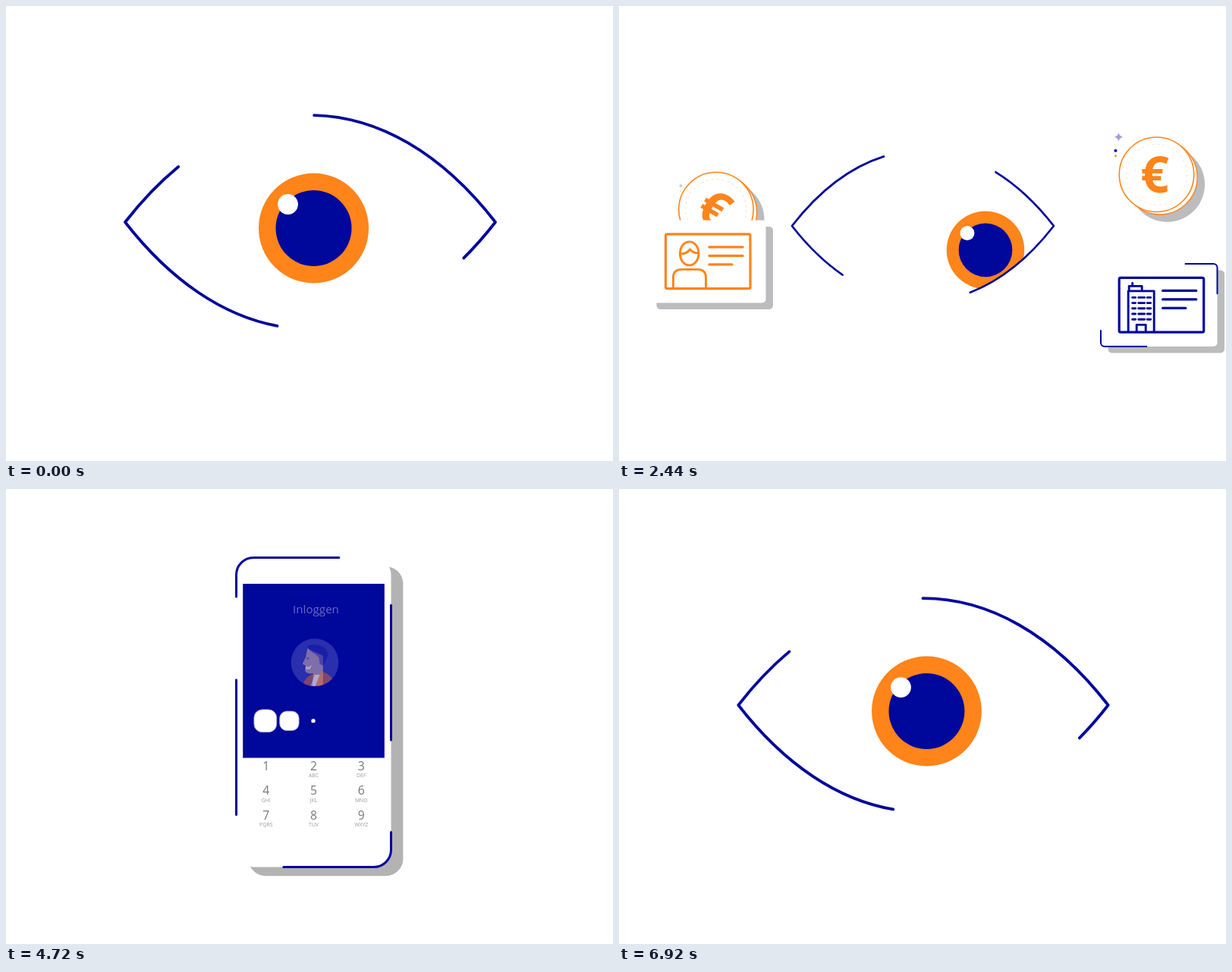
Recreate the animation shown at these times as an HTML page with a canvas. Size 800x600 px, loop 6.96 s.

```html
<!DOCTYPE html>
<html lang="nl">
<head>
<meta charset="utf-8">
<title>Inloggen</title>
<style>
html, body { margin: 0; width: 100%; height: 100%; overflow: hidden; background: #fff; }
canvas { display: block; }
</style>
</head>
<body>
<canvas id="stage" width="800" height="600"></canvas>
<script>
const c = document.getElementById('stage').getContext('2d');
const LOOP = 6960, STEP = 40;
const NAVY = '#00079b', ORANGE = '#ff841a', GREY = '#b3b3b3';

// ---- Easing: t, from and to in ms
const clamp = p => Math.min(1, Math.max(0, p));
const part = (t, from, to) => clamp((t - from) / (to - from));
function ramp(t, from, to) {
  const p = part(t, from, to);
  return p * p * (3 - 2 * p);
}
const during = (t, from, to, fade) => ramp(t, from, from + fade) * (1 - ramp(t, to, to + fade));
// Springs from 0 to 1 with overshoot
function pop(t, from, damping = 8.5) {
  const s = (t - from) / 1000;
  return s <= 0 ? 0 : 1 - Math.exp(-damping * s) * Math.cos(5 * Math.PI * s);
}
// Swells away from 0 and settles back
function bump(t, from) {
  const s = (t - from) / 1000;
  return s <= 0 ? 0 : 0.4 * Math.exp(-4.9 * s) * Math.sin(2.5 * Math.PI * s);
}
const backOut = p => p <= 0 ? 0 : 1 + 2.7 * (p - 1) ** 3 + 1.7 * (p - 1) ** 2;

// ---- Drawing
function group(x, y, scale, draw) {
  c.save();
  c.translate(x, y);
  c.scale(scale, scale);
  draw();
  c.restore();
}
function paint(path, fill, stroke, width) {
  if (fill) { c.fillStyle = fill; c.fill(path); }
  if (stroke) { c.strokeStyle = stroke; c.lineWidth = width; c.stroke(path); }
}
function circle(x, y, r, fill, stroke, width) {
  const p = new Path2D();
  p.arc(x, y, r, 0, 7);
  paint(p, fill, stroke, width);
}
// Rounded box running clockwise from the top left
function box(x, y, w, h, r) {
  const p = new Path2D();
  p.moveTo(x + r, y);
  p.arcTo(x + w, y, x + w, y + h, r);
  p.arcTo(x + w, y + h, x, y + h, r);
  p.arcTo(x, y + h, x, y, r);
  p.arcTo(x, y, x + w, y, r);
  p.closePath();
  return p;
}
const boxLength = (w, h, r) => 2 * (w + h) - 8 * r + 2 * Math.PI * r;

function dash(path, total, start, length, width) {
  if (length <= 0) return;
  c.save();
  c.setLineDash([length, total - length]);
  c.lineDashOffset = -start;
  paint(path, null, NAVY, width);
  c.restore();
}
function text(s, x, y, size, color, weight = 400) {
  c.font = `${weight} ${size}px "Open Sans", sans-serif`;
  c.textAlign = 'center';
  c.fillStyle = color;
  c.fillText(s, x, y + size * 0.357);
}

// ---- Eye
const LID = new Path2D('M-244 0C-98 -188 98 -188 244 0C98 188 -98 188 -244 0Z');
const LID_LENGTH = 1168;

function eye(t) {
  const again = t > 5000, time = again ? t - LOOP : t;
  const small = again ? 0 : ramp(t, 400, 860);
  const s = again ? pop(t, 6160) : (1 - 0.293 * small) * (1 - ramp(t, 3180, 3520));
  if (s <= 0) return;
  const left = ramp(time, 620, 1200), right = ramp(time, 1680, 2360), back = ramp(time, 2760, 3120);
  const x = 4.5 - 149.5 * left + 261.7 * right - 112.2 * back;
  const y = 8 + 16 * left + 21 * right - 37 * back;
  const swing = quarter => Math.sin(Math.PI / 2 * time / quarter);
  group(401 - small / 2, 285 + 5 * small, s, () => {
    c.save();
    c.clip(LID);
    circle(x, y, 72.5, ORANGE);
    circle(x, y, 50, NAVY);
    circle(x - 34, y - 31.5, 13.4, '#fff');
    c.restore();
    dash(LID, LID_LENGTH, 297 + 161 * swing(1820), 350, 3.8);
    dash(LID, LID_LENGTH, 919.5 + 123 * swing(2020), 350, 3.8);
  });
}

// ---- Cards and coins
const CARD_W = 153.5, CARD_H = 109;
const TEXT_LINES = new Path2D('M57.500 17h44M57.500 28.500h44M57.500 40h30');
const PERSON = new Path2D('M10 71v-14q0 -10.500 11 -10.500h21q11 0 11 10.500v14' +
  'M43.500 25.500a12.300 15.500 0 1 1 -24.600 0a12.300 15.500 0 1 1 24.600 0M20 26q8 0 12 -6q4 5 11 5');
const BUILDING = new Path2D('M12 70.500v-53h34v53M13 17v-6h17v6M17.500 11v-4M23 70v-8h12v8');
for (let row = 0; row < 5; row++) {
  const y = 26 + row * 7.2;
  BUILDING.addPath(new Path2D(`M17.500 ${y}h4M25.500 ${y}h8M37 ${y}h4.500`));
}
const STAR = new Path2D('M0 -6q.800 5.200 6 6q-5.200 .800 -6 6q-.800 -5.200 -6 -6q5.200 -.800 6 -6z');

function card(x, y, scale, color, inset, starts, length, icon) {
  if (scale <= 0) return;
  group(x + CARD_W / 2, y + CARD_H / 2, scale, () => {
    c.translate(-CARD_W / 2, -CARD_H / 2);
    const body = box(0, 0, CARD_W, CARD_H, 5);
    paint(box(9.5, 8.5, CARD_W, CARD_H, 5), '#bcbcbe');
    paint(body, '#fff');
    for (const s of starts) dash(body, boxLength(CARD_W, CARD_H, 5), s, length, 2);
    c.translate(inset, 18.4);
    paint(box(0, 0, 111.5, 71.8, 2), null, color, 3.2);
    paint(TEXT_LINES, null, color, 3.4);
    paint(icon, null, color, 2.9);
  });
}

// A coin that rises from behind the edge at floor and sinks again
function coin(t, x, floor, height, rise, fall, angle, starX) {
  if (t < rise || t > fall + 615) return;
  const up = ramp(t, rise, rise + 420) * (1 - ramp(t, fall, fall + 615));
  c.save();
  c.beginPath();
  c.rect(0, 0, 800, floor);
  c.clip();
  c.translate(x, floor + 57 - height * up);
  circle(14, 13, 49.5, '#bcbcbe');
  circle(4.5, 3.5, 49.2, '#fff', ORANGE, 1.5);
  circle(0, 0, 49.2, '#fff', ORANGE, 1.6);
  c.save();
  c.rotate(angle * Math.PI / 180);
  c.setLineDash([3, 4]);
  c.lineCap = 'butt';
  circle(0, 0, 40, null, '#f6dccb', 0.8);
  text('€', -2.5, 0, 66, ORANGE, 700);
  c.restore();
  c.translate(starX, -49.5);
  c.globalAlpha = during(t, rise + 300, fall + 20, 240);
  paint(STAR, NAVY);
  c.globalAlpha = during(t, rise + 300, fall + 170, 240);
  circle(-4, 18, 2, NAVY);
  circle(-4, 25, 1.4, ORANGE);
  c.restore();
}

function leftCard(t) {
  if (t < 640) return;
  const since = t - 1600;
  coin(t, 112 + since * 0.019, 283.5, 171, 860, 2100, -12 + since * 0.05, -42.5);
  card(40 - 215 * (1 - ramp(t, 680, 920)), 282.5, 1 - ramp(t, 2720, 2900), ORANGE, 21.5,
    [92 - since * 0.01, 333 - since * 0.02], 79 * during(t, 900, 1900, 400), PERSON);
}

function rightCard(t) {
  const since = t - 1600, drift = part(t, 1600, 2440);
  coin(t, 698.5 + 10 * drift, 337 + 3 * drift, 210, 1380, 2280, -30 + since * 0.0357, -50);
  card(633.5 + 1.5 * drift, 337 + 3 * drift, during(t, 960, 2960, 260), NAVY, 24.2,
    [106.5, 362 - since * 0.019], 79 * during(t, 1160, 2700, 280), BUILDING);
}

// ---- Phone
const LETTERS = ['', 'ABC', 'DEF', 'GHI', 'JKL', 'MNO', 'PQRS', 'TUV', 'WXYZ'];
const CODE = [2, 5, 7, 9, 4];
const FIRST_TAP = 5228, TAP = 170, FLIGHT = 240;
const keySpot = i => [(i % 3 - 1) * 58, 10 + Math.floor(i / 3) * 30];

function avatar() {
  const disc = new Path2D();
  disc.arc(0, 0, 29, 0, 7);
  paint(disc, '#686cc8');
  c.clip(disc);
  paint(new Path2D('M-9 -17L-11 -7L-15 2L-11 4L-12 10Q-9 15 -2 13L-3 29H10V-8Z'), '#fbd0a5');
  paint(new Path2D('M-9 -20C-2 -24 14 -20 14 -14C19 -11 13 -2 10 4L6 2L5 -6L1 -10Q-7 -13 -9 -20Z'), NAVY);
  paint(new Path2D('M-16 30Q-13 18 0 13L-6 30ZM-1 30L8 11Q23 15 25 30Z'), '#ff6d10');
  paint(new Path2D('M-6 30L0 15L6 15L0 30ZM-11 4Q-8 8 -4 3Q-5 10 -11 8Z'), '#fff');
  circle(-8.5, -5, 1.3, NAVY);
}

function pin(x, y, scale, filled) {
  if (scale <= 0) return;
  group(x, y, scale, () => {
    paint(box(-12.5, -12.5, 25, 25, 9), filled ? ORANGE : '#fff', filled ? null : '#a9abc4', 0.8);
    if (!filled) return;
    for (let a = 0; a < 3; a++) {
      paint(new Path2D('M0 -4V4'), null, '#fff', 1.7);
      c.rotate(Math.PI / 3);
    }
  });
}

function keypad(t, cx, top, u, bottom, pressed) {
  group(cx, top, u, () => {
    LETTERS.forEach((letters, i) => {
      const [x, y] = keySpot(i), on = i + 1 === pressed;
      if (top + (y + 20) * u > bottom) return;
      if (on) paint(box(x - 27.5, y - 11, 56.5, 29.5, 0), ORANGE);
      text(i + 1, x, y, 14.5, on ? '#b8501c' : '#77767f', 500);
      text(letters, x, y + 11.7, 6.3, on ? '#d0651c' : '#9a9aa2');
    });
    c.globalAlpha = part(t, 4760, 4900);
    text('0', 0, 104, 14.5, '#77767f', 500);
    paint(new Path2D('M48.500 104l6 -7h10q2 0 2 2v10q0 2 -2 2h-10z'), '#3d3640');
    paint(new Path2D('M57 101.500l5 5m0 -5l-5 5'), null, '#fff', 1.4);
  });
}

function phone(t) {
  if (t < 3626 || t > 6360) return;
  const swell = bump(t, 4440);
  const u = 1 + 0.39 * Math.exp((3626 - t) / 110) + swell;
  const w = 188.5 * u, h = 389 * (pop(t, 3626) + bump(t, 4400));
  const cx = 405.5 + 520 * part(t, 5900, 6340) ** 2, cy = 296.5 - 24 * swell;
  const x = cx - w / 2, y = cy - h / 2, bottom = y + h;
  const r = Math.min(21 * u, h / 2), body = box(x, y, w, h, r), total = boxLength(w, h, r);
  paint(box(x + 14.7 * u, y + Math.min(10.8 * u, 12), w, h, r), GREY);
  paint(body, '#fff');

  // Outline parts sway around the edge, every second one further
  const length = 0.057 + 0.093 * ramp(t, 3640, 3960), sway = ((t - 4700) / 940) ** 2;
  for (let i = 0; i < 4; i++) {
    const odd = i % 2;
    if (!odd && t < 3700) continue;
    const start = -0.055 + 0.2525 * i - (0.05 + 0.045 * odd) * sway;
    dash(body, total, start * total, length * total, 2.8 * u);
  }

  const open = ramp(t, 4120, 4400);
  if (open <= 0) return;
  const top = y + 34.5, padTop = y + 380 - 150 * ramp(t, 4440, 4845);
  c.fillStyle = NAVY;
  c.fillRect(x + 8.7, top, w - 17.4, (Math.min(bottom - 41 * u, padTop) - top) * open);

  const k = 1 + (u - 1) * 0.25;
  c.save();
  c.globalAlpha = part(t, 4560, 4960);
  text('Inloggen', cx + 3, cy - 133.5 * k, 14 * u, '#fff');
  group(cx + 1.5, cy - 64.5 * k, u, avatar);
  c.restore();

  if (padTop < bottom - 20)
    keypad(t, cx, padTop, u, bottom, CODE[Math.floor((t - FIRST_TAP) / TAP)]);

  // Each tap sends a drop from its key to the next field
  const pinY = cy + 11 * k;
  CODE.forEach((digit, i) => {
    const pinX = cx - 0.5 + (i - 2) * 29.2 * u;
    const p = (t - FIRST_TAP - i * TAP) / FLIGHT, q = 1 - p;
    const size = backOut(part(t, 4552 + i * 78, 4832 + i * 78));
    pin(pinX, pinY, u * size, p >= 1);
    if (p <= 0 || p >= 1) return;
    const [kx, ky] = keySpot(digit - 1);
    circle(q * q * (cx + kx) + 2 * p * q * (cx + kx - 30) + p * p * pinX,
      q * q * (padTop + ky + 3) + 2 * p * q * 235 + p * p * pinY, 7, ORANGE);
  });
}

// ---- Check mark
const CHECK = new Path2D('M-70.500 -46.500L-24.500 -0.500L68 -92.500L114 -46L-24 92L-116.500 -0.500Z');

function check(t) {
  const s = pop(t, 4820, 5.5) * (1 - ramp(t, 5660, 5980));
  if (s <= 0) return;
  group(225, 300.5, s, () => {
    circle(0, 0, 137, null, '#c9cbe6', 1);
    c.save();
    c.setLineDash([2, 5]);
    circle(0, 0, 119, null, '#c9cbe0', 0.7);
    c.restore();
    paint(CHECK, ORANGE);
    c.rotate((t - 5640) * 0.0012);
    circle(-4, -93.5, 9.8, '#fff', NAVY, 2.6);
    circle(-100, 85.5, 5.5, NAVY);
  });
}

const begin = performance.now();
function frame() {
  const t = Math.floor((performance.now() - begin) % LOOP / STEP) * STEP;
  c.fillStyle = '#fff';
  c.fillRect(0, 0, 800, 600);
  c.lineCap = c.lineJoin = 'round';
  eye(t);
  leftCard(t);
  rightCard(t);
  phone(t);
  check(t);
  requestAnimationFrame(frame);
}
frame();
</script>
</body>
</html>
```
